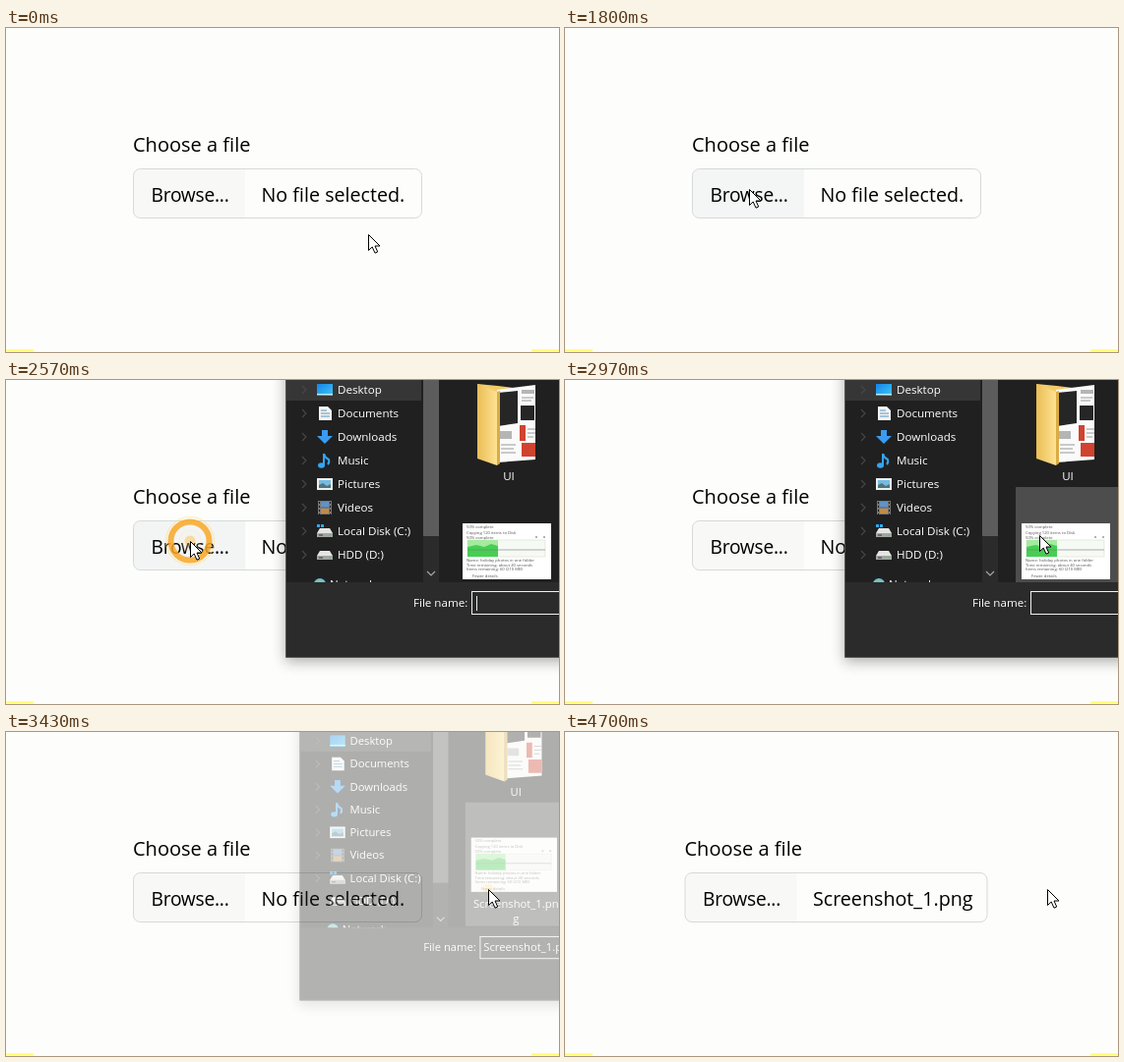
Animation, 562 px wide and 330 px high, one loop 4930 ms. Source, as an HTML page:

```html
<!DOCTYPE html>
<html lang="en">
<head>
<meta charset="utf-8">
<title>Choose a file</title>
<style>
  html, body { margin: 0; width: 100%; height: 100%; overflow: hidden; background: #fdfdfb; }
  svg { display: block; font-family: "Open Sans", "Noto Sans", sans-serif; }
  .page { font-size: 20px; fill: #000; }
  .small { font-size: 11.6px; fill: #fff; }
  .tiny { font-size: 4.2px; fill: #555; }
  .mid { text-anchor: middle; }
  .chevron { fill: none; stroke: #484848; stroke-width: 1.1; }
</style>
</head>
<body>
<svg width="562" height="330" viewBox="0 0 562 330">
  <defs>
    <filter id="shadow" x="-10%" y="-10%" width="120%" height="120%">
      <feGaussianBlur stdDeviation="7"/>
    </filter>
    <clipPath id="body"><rect x="284" y="-60" width="480" height="266"/></clipPath>
    <linearGradient id="folder"><stop stop-color="#e9bd55"/><stop offset="1" stop-color="#ffe293"/></linearGradient>
    <linearGradient id="screen" x2="1" y2="1"><stop stop-color="#1585e6"/><stop offset="1" stop-color="#42c5f6"/></linearGradient>
    <g id="drive">
      <path d="M3 0H13L16 5V9H0V5Z" fill="#e5e5e5"/>
      <path d="M0 5H16V9H0Z" fill="#a4a4a4"/>
      <path d="M2 7H6" stroke="#363636"/><path d="M12 7H14" stroke="#43d743"/>
    </g>
  </defs>

  <rect width="562" height="330" fill="#fdfdfb"/>
  <path d="M0 328.5H28M534 328.5H562" stroke="#fffa70" stroke-width="2"/>

  <g id="field" class="page">
    <text x="129" y="126">Choose a file</text>
    <rect id="box" x="129.5" y="143.5" height="50" rx="7" fill="#fdfdfb"/>
    <path id="button" d="M243 144H137Q130 144 130 151V186Q130 193 137 193H243Z"/>
    <rect id="outline" x="129.5" y="143.5" height="50" rx="7" fill="none" stroke="#d6d9da"/>
    <text x="147.5" y="177" font-size="19.2" letter-spacing="-.25">Browse...</text>
    <text id="chosen" x="259.5" y="177" font-size="19.7"></text>
  </g>

  <g id="dialog">
    <rect x="284" y="-60" width="500" height="347" fill="#202020" opacity=".36" filter="url(#shadow)"/>
    <g id="skeleton">
      <rect x="284" y="-60" width="480" height="342" fill="#2b2b2b"/>
      <rect x="424" y="-60" width="16" height="266" fill="#464646"/>
      <path d="M441 -60H764V206H441Z M414 219H468V234H414Z M473 215H764V239H473Z" fill="#fff"/>
      <path class="chevron" d="M428 195L432 199L436 195" style="stroke:#fff"/>
    </g>
    <g id="content">
      <rect x="284" y="-60" width="480" height="342" fill="#202020"/>
      <rect x="284" y="206" width="480" height="76" fill="#2b2b2b"/>
      <g clip-path="url(#body)">
        <rect x="285" y="-3" width="137" height="24" fill="#363636"/>
        <g id="rows" class="small"></g>

        <rect x="316" y="4" width="16" height="12" fill="url(#screen)"/>
        <path d="M316 14.5H332" stroke="#c8eaf8"/>
        <path d="M318 27H327L331 31V41H318Z" fill="#f4f4f4"/>
        <path d="M320 31H326M320 34H329M320 37H329" stroke="#5795bc"/>
        <path d="M321 51H327V57H332L324 65L316 57H321Z" fill="#3a9cf0"/>
        <path d="M323 75V87M323 75Q324 79 328 81Q329 84 327 86" fill="none" stroke="#34a4f0" stroke-width="2"/>
        <ellipse cx="320.5" cy="87" rx="3.5" ry="2.7" fill="#34a4f0"/>
        <rect x="316" y="100" width="16" height="12" fill="#eee"/>
        <path d="M318 102H330V110H318Z" fill="#75bbe4"/><path d="M318 110V107L322 105L326 108L330 106V110Z" fill="#4c767b"/>
        <rect x="317" y="123" width="14" height="14" fill="#777"/>
        <path d="M320 124H328V129H320Z" fill="#5e94cb"/><path d="M320 131H328V136H320Z" fill="#c18b4a"/>
        <path d="M318.5 124V137M329.5 124V137" stroke="#1d1d1d" stroke-dasharray="2 2"/>
        <use href="#drive" x="316" y="151"/>
        <path d="M316 147H319V150H316ZM320 147H323V150H320Z" fill="#2ea8f0"/>
        <use href="#drive" x="316" y="174"/>
        <circle cx="319" cy="208" r="6" fill="#67bfe8"/>
        <path d="M315 205L320 203L322 207Z" fill="#83c78a"/>

        <rect x="424" y="-60" width="16" height="266" fill="#2b2b2b"/>
        <rect x="424" y="-60" width="16" height="219" fill="#5c5c5c"/>
        <path class="chevron" d="M428 195L432 199L436 195" style="stroke:#aaa"/>

        <g id="files">
          <path d="M479 4L500 6L524 9V20H479Z" fill="#f3cb68"/>
          <path d="M499 10L538 5V81L499 84Z" fill="#fafafa"/>
          <path d="M500 13L520 11V44L500 47ZM523 26H537V41H523Z" fill="#262626"/>
          <path d="M524 10H537V14H524ZM502 52H514V60H502Z" fill="#b5b5b5"/>
          <path d="M522 46H528V62H522ZM524 64H538V78H524Z" fill="#d0432f"/>
          <path d="M503 66H518M503 70H516M503 74H518M530 50H538M530 54H538M530 58H536M524 18H536M524 21H534" stroke="#999"/>
          <path d="M479 4L499 12V87L479 80Z" fill="url(#folder)"/>
          <path d="M499 12L502 11V85L499 87Z" fill="#d9ac45"/>
          <text class="small mid" x="511" y="102">UI</text>

          <rect id="tile" x="458" y="109" width="106" height="130" fill="#4d4d4d"/>
          <rect x="464" y="146" width="90" height="57" fill="#fff"/>
          <g class="tiny">
            <text x="468" y="151">50% complete</text>
            <text x="468" y="157">Copying 120 items to Disk</text>
            <text x="468" y="161.5">50% complete</text>
            <text x="468" y="185">Name: holiday photos in one folder</text>
            <text x="468" y="189.5">Time remaining: about 40 seconds</text>
            <text x="468" y="194">Items remaining: 60 (210 MB)</text>
            <text x="474" y="201">Fewer details</text>
          </g>
          <path d="M538 160H540M546 160H548" stroke="#666"/>
          <rect x="469" y="163" width="79" height="17" fill="#f6faf4" stroke="#d5dfcd" stroke-width=".6"/>
          <path d="M469 163H500V180H469Z" fill="#a5eaa0"/>
          <path d="M469 180V170L478 168L486 170L493 167L500 169V180Z" fill="#45cf53"/>
          <path d="M469 173H548" stroke="#777" stroke-width=".6"/>
          <text class="small mid" x="511" y="220">Screenshot_1.pn</text>
          <text class="small mid" x="511" y="235">g</text>
        </g>
      </g>
      <text class="small" x="414" y="231">File name:</text>
      <rect x="473.5" y="215.5" width="290" height="23" fill="#2b2b2b" stroke="#f0f0f0"/>
      <path id="caret" d="M478.5 220V235" stroke="#e4ecf4"/>
      <text id="filename" class="small" x="477" y="231">Screenshot_1.png</text>
    </g>
    <path d="M284.5 -60V282.5H764" fill="none" stroke="#555"/>
  </g>

  <g id="ripple">
    <circle id="halo" r="11" fill="#fff2c8" stroke="#f4dc91"/>
    <circle id="glow" fill="none" stroke="#ffe07a" stroke-width="1.5"/>
    <circle id="ring" fill="none" stroke="#f9a825"/>
    <circle id="dot" r="5.5" fill="#fba400"/>
  </g>
  <g id="cursor">
    <path id="arrow" d="M.5 .5V16.5L4.2 13L7 19.2L9.7 18L7 12H12Z" fill="#fff" stroke="#000"/>
    <path id="beam" d="M-3 -7.5H-1L0 -6.5L1 -7.5H3M0 -6.5V6.5M-3 7.5H-1L0 6.5L1 7.5H3" fill="none" stroke="#000"/>
  </g>
</svg>
<script>
const LOOP = 4930;
const $ = id => document.getElementById(id);
const set = (id, attrs) => {
  for (const name in attrs) $(id).setAttribute(name, attrs[name]);
};
const show = (id, on) => set(id, { visibility: on ? "inherit" : "hidden" });

// Keys are [time, value, ...]; values between them are interpolated linearly.
function track(keys, t, column = 1) {
  const next = keys.findIndex(key => key[0] > t);
  if (next < 0) return keys[keys.length - 1][column];
  if (next === 0) return keys[0][column];
  const a = keys[next - 1], b = keys[next];
  return a[column] + (b[column] - a[column]) * (t - a[0]) / (b[0] - a[0]);
}

const pointer = [
  [200, 368, 210], [530, 371, 215], [670, 371, 215], [850, 356, 188],
  [1030, 340, 168], [1170, 326, 166], [1320, 286, 165], [1500, 218, 164],
  [1700, 187, 164], [2600, 187, 164], [2700, 220, 163], [2850, 390, 160],
  [2970, 482, 158], [3070, 490, 160]
];
const dialogAlpha = [[2320, 0], [2370, .38], [2480, 1], [3370, 1], [3430, .36], [3500, 0]];
const dialogScale = [[2320, .955], [2370, .97], [2480, 1], [3370, 1], [3430, .97], [3500, .94]];
const hover = [[1730, 0], [1830, 1], [2640, 1], [2740, 0]];
const ringRadius = [[0, 6], [340, 18], [540, 19.5], [720, 21]];
const ringWidth = [[0, 2], [340, 2], [540, 6]];
const ringAlpha = [[0, 1], [540, .85], [650, 0]];
const dotAlpha = [[0, 1], [340, 1], [540, .3], [720, 0]];

const places = ["Desktop", "Documents", "Downloads", "Music", "Pictures", "Videos", "Local Disk (C:)", "HDD (D:)"];
$("rows").innerHTML = places.map((name, i) =>
  `<path class="chevron" d="M301 ${6 + 24 * i}l4 4l-4 4"/><text x="337" y="${14 + 24 * i}">${name}</text>`
).join("") + '<text x="329" y="212">Network</text>';

function drawField(t) {
  const done = t >= 3550, width = done ? 307 : 293;
  $("chosen").textContent = done ? "Screenshot_1.png" : "No file selected.";
  set("field", { transform: `translate(${done ? -7.5 : 0} 0)` });
  set("box", { width });
  set("outline", { width });
  const h = track(hover, t);
  set("button", { fill: `rgb(${248 - 5 * h},${249 - 5 * h},${246 - 2 * h})` });
}

function drawDialog(t, x, y) {
  const alpha = track(dialogAlpha, t), scale = track(dialogScale, t);
  const selected = t >= 3130;
  show("dialog", alpha > 0);
  set("dialog", {
    opacity: alpha,
    transform: `translate(750 -17) scale(${scale}) translate(-750 17)`
  });
  show("skeleton", t < 2430);
  show("content", t >= 2430);
  set("files", { transform: `translate(0 ${selected ? -34.5 : 0})` });
  show("tile", t > 2600 && x > 458 && y > 109);
  show("filename", selected);
  show("caret", t < 2930);
}

function drawRipple(t) {
  const second = t >= 3080;
  const age = second ? (t - 3080) * 1.9 : t - 2030;
  const r = track(ringRadius, age), ring = track(ringAlpha, age), dot = track(dotAlpha, age);
  show("ripple", age >= 0 && age < 720);
  set("ripple", { transform: `translate(${second ? "490 160" : "187 164"})` });
  set("ring", { r, "stroke-width": track(ringWidth, age), opacity: ring });
  set("glow", { r: r + 5, opacity: ring * .5 });
  set("dot", { opacity: dot });
  set("halo", { opacity: dot * .6 });
}

function drawPointer(t, x, y) {
  const covered = t > 2320 && x > 284;
  const overText = x > 243 && x < 423 && y > 144 && y < 194 && !covered;
  set("cursor", { transform: `translate(${Math.round(x)} ${Math.round(y)})` });
  show("arrow", !overText);
  show("beam", overText);
}

const start = performance.now();
function draw() {
  const t = (performance.now() - start) % LOOP;
  const x = track(pointer, t), y = track(pointer, t, 2);
  drawField(t);
  drawDialog(t, x, y);
  drawRipple(t);
  drawPointer(t, x, y);
  requestAnimationFrame(draw);
}
draw();
</script>
</body>
</html>
```
